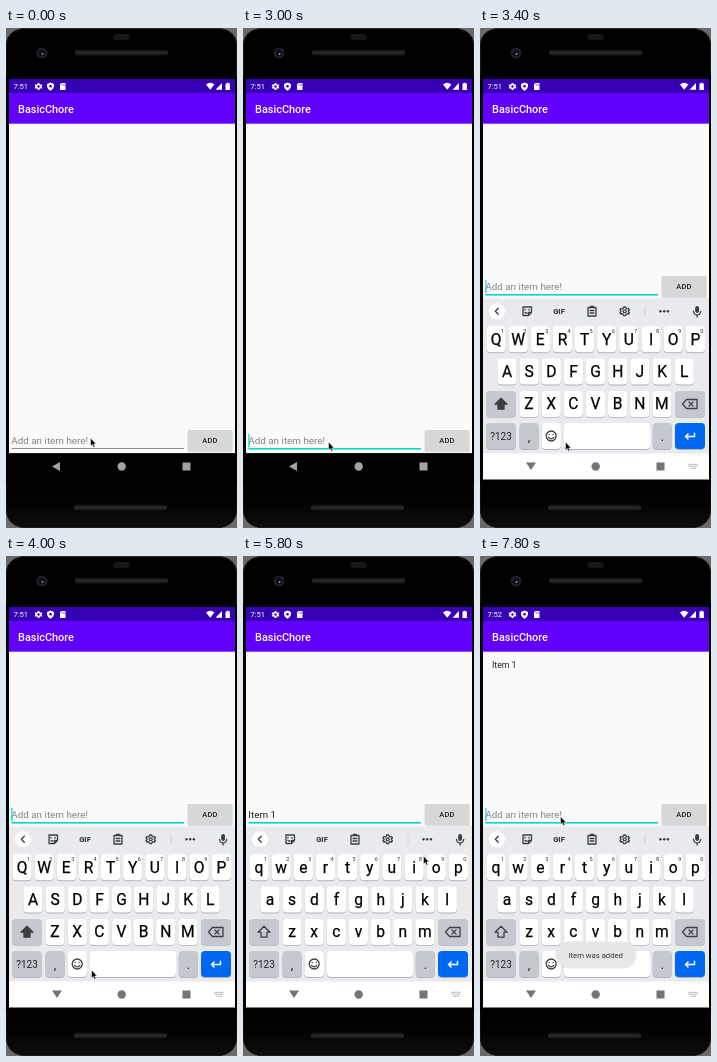
An HTML page for the animation above (8 s loop, 231 by 500 pixels).

```html
<!DOCTYPE html>
<html lang="en">
<head>
<meta charset="utf-8">
<title>To-do app</title>
<style>
  html, body { margin: 0; width: 100%; height: 100%; overflow: hidden; background: #000; }
  svg { display: block; width: 100vw; height: 100vh; }
  text { font-family: Roboto, sans-serif; white-space: pre; }
  .mid { text-anchor: middle; }
  .medium { font-weight: 500; }
  .line { fill: none; stroke: #3c3f43; stroke-width: 1.3; stroke-linecap: round; stroke-linejoin: round; }
  .letter { font-size: 15.6px; fill: #000; stroke: #000; stroke-width: .25; }
</style>
</head>
<body>
<svg viewBox="0 0 231 500">
  <defs>
    <clipPath id="screen"><rect x="3" y="51" width="226" height="400.500"/></clipPath>
    <linearGradient id="slot" x2="0" y2="1">
      <stop stop-color="#0c0c0c"/><stop offset=".5" stop-color="#2a2a2a"/><stop offset="1" stop-color="#141414"/>
    </linearGradient>
    <linearGradient id="chin" x2="0" y2="1">
      <stop stop-color="#000"/><stop offset=".5" stop-color="#020202"/><stop offset="1" stop-color="#0d0d0d"/>
    </linearGradient>
    <path id="gear" d="M-1-4.3H1L1.4-3 2.6-2.3 3.9-2.8 4.7-1.2 3.7-.4V.4L4.7 1.2 3.9 2.8 2.6 2.3 1.4 3 1 4.3H-1L-1.4 3-2.6 2.3-3.9 2.8-4.7 1.2-3.7.4V-.4L-4.7-1.2-3.9-2.8-2.6-2.3-1.4-3Z"/>
  </defs>

  <rect width="231" height="500" fill="#6a6a6a"/>
  <path d="M0 54V16Q1.500 3 16 .5H215Q229.500 3 231 16V54Z" fill="#000" stroke="#2c2c2c"/>
  <path d="M0 450V482Q1.500 497 16 499.500H215Q229.500 497 231 482V450Z" fill="url(#chin)" stroke="#1c1c1c"/>
  <rect y="48" width="231" height="408" fill="#000"/>
  <rect x="107.500" y="6" width="16" height="6" rx="2" fill="#161616"/>
  <rect x="69" y="21.500" width="93" height="6" rx="3" fill="url(#slot)"/>
  <rect x="68" y="476.500" width="93" height="6" rx="3" fill="url(#slot)"/>
  <circle cx="36" cy="25" r="5.500" fill="#202126"/>
  <circle cx="36" cy="25" r="3.300" fill="#0d0f18"/>
  <circle cx="36.500" cy="26" r="1" fill="#8990a8"/>

  <g clip-path="url(#screen)">
    <rect x="3" y="95" width="226" height="330.300" fill="#fafafa"/>
    <rect x="3" y="65" width="226" height="30.700" fill="#6200ff"/>
    <rect x="3" y="51" width="226" height="14" fill="#3700b3"/>
    <g fill="#fff">
      <text id="clock" x="7.500" y="61.300" font-size="7.600">7:51</text>
      <use href="#gear" transform="translate(32.500 58.500) scale(.8)"/>
      <circle cx="32.500" cy="58.500" r="1.200" fill="#3700b3"/>
      <path d="M44.500 54.500 48 56V58.500Q47.500 61.500 44.500 62.800 41.500 61.500 41 58.500V56Z"/>
      <circle cx="44.500" cy="58.300" r="1.300" fill="#3700b3"/>
      <path d="M55.500 55H59.500V62H54V56.500Z"/>
      <path d="M56 56.200V57.800M57.300 56.200V57.800M58.500 56.200V57.800" stroke="#3700b3" stroke-width=".5"/>
      <path d="M200 56.500Q204.200 53.200 208.400 56.500L204.200 61.700Z"/>
      <path d="M209.500 61.700 216 55V61.700Z"/>
      <path d="M219.500 55.500H220.700V54.700H222.700V55.500H223.900V62H219.500Z"/>
      <text class="medium" x="12" y="84.500" font-size="10.900">BasicChore</text>
    </g>
    <text id="item" x="12" y="112.200" font-size="8.700" fill="#222">Item 1</text>

    <g id="entry">
      <rect id="rule" x="5.500" width="172.500"/>
      <text id="field" x="5.300" y="416.400" font-size="9.850"></text>
      <rect id="under" x="5.500" y="418" height=".8" fill="#222"/>
      <rect id="caret" y="406" width="1.200" height="13.500" fill="#03dac5"/>
      <rect x="181.700" y="403.300" width="44.800" height="21" rx="1" fill="#000" opacity=".12"/>
      <rect id="add" x="181.700" y="402" width="44.800" height="21" rx="1"/>
      <text class="mid medium" x="203.900" y="415" font-size="7.500" letter-spacing=".2" fill="#222">ADD</text>
    </g>

    <g id="navDark" fill="#a3a3a3">
      <rect x="3" y="425.300" width="226" height="27" fill="#000"/>
      <path d="M54 434V443L46 438.500Z"/>
      <circle cx="115.700" cy="438.500" r="4.200"/>
      <rect x="176.500" y="434.500" width="8" height="8"/>
    </g>

    <g id="kb">
      <g id="board">
        <rect x="3" y="270.500" width="226" height="156" fill="#e8eaed"/>
        <rect x="3" y="425.500" width="226" height="30" fill="#fff"/>
        <circle cx="17" cy="283.300" r="8" fill="#fff"/>
        <path id="chevron" class="line"/>
        <g id="tools">
          <path class="line" d="M43 279H51.500V284.500L48.500 287.500H43Z M48.500 287.500V284.500H51.500 M45 281.500V282M49 281.500V282M45 284.500Q46 285.500 47 284.800"/>
          <text class="mid" x="79" y="286" font-size="7.500" font-weight="800" fill="#3c3f43">GIF</text>
          <path class="line" d="M108 279.500H116V288H108ZM110.500 279.500V278.300H113.500V279.500M110 282.500H114M110 285H114"/>
          <use href="#gear" class="line" transform="translate(144.700 283.300)"/>
          <circle class="line" cx="144.700" cy="283.300" r="1.500"/>
          <path d="M165 279V288" stroke="#cfd1d4" stroke-width=".8"/>
          <g fill="#3c3f43"><circle cx="180.500" cy="283.300" r="1.200"/><circle cx="184.200" cy="283.300" r="1.200"/><circle cx="187.900" cy="283.300" r="1.200"/></g>
        </g>
        <g id="words" font-size="9.700" fill="#303236">
          <text class="mid" x="53" y="286.600">Item</text>
          <text class="mid" x="115" y="286.600">Items</text>
          <text class="mid" x="177" y="286.600">Itemized</text>
          <path d="M84.500 276.500V290.500M147.500 276.500V290.500" stroke="#c4c6ca" stroke-width=".8"/>
        </g>
        <rect x="215.200" y="278" width="3.800" height="7" rx="1.900" fill="#3c3f43"/>
        <path class="line" d="M213.500 283.500Q214 287 217.100 287 220.200 287 220.700 283.500M217.100 287V289"/>
        <g id="keys"></g>
        <path id="shift" class="line" d="M21 370.200 27 376.200H24V381.200H18V376.200H15Z"/>
        <path class="line" d="M202.500 376 206.500 371.500H217V380.500H206.500ZM209 374 213 378M213 374 209 378"/>
        <g fill="#202226">
          <text class="mid" x="21" y="411.600" font-size="10">?123</text>
          <text class="mid" x="49" y="412.500" font-size="12.500">,</text>
          <text class="mid" x="182.300" y="412.500" font-size="12.500">.</text>
        </g>
        <circle class="line" cx="71.200" cy="408" r="5"/>
        <path class="line" d="M69.300 406.300V406.600M73.100 406.300V406.600M68.500 409.300Q71.200 412.500 73.900 409.300"/>
        <path d="M214.500 404.800V408.500H205.500M208.500 405.500 205.500 408.500 208.500 411.500" fill="none" stroke="#fff" stroke-width="1.400"/>
      </g>
      <g fill="#757575">
        <path d="M46 434.500H56L51 442Z"/>
        <circle cx="115.700" cy="438.500" r="4.200"/>
        <rect x="176.500" y="434.500" width="8" height="8"/>
        <path d="M208.500 436.300H218M208.500 438.200H218M210.500 440.300H216" stroke="#8a8a8a" stroke-width=".9" stroke-dasharray="1 .6"/>
      </g>
    </g>

    <g id="toast">
      <rect x="75.500" y="386" width="81" height="26.500" rx="13.200" fill="#000" opacity=".08"/>
      <rect x="75.500" y="385.500" width="80.500" height="26" rx="13" fill="#e7e7e7"/>
      <text class="mid" x="115.700" y="401.500" font-size="7.700" fill="#333">Item was added</text>
    </g>
  </g>

  <path id="mouse" d="M0 0V8L1.800 6.400 3 9.200 4.400 8.600 3.200 5.900H5.600Z" fill="#000" stroke="#fff" stroke-width=".5"/>
</svg>
<script>
const NS = 'http://www.w3.org/2000/svg';
const LOOP = 8000, STEP = 200;
const el = {};
document.querySelectorAll('[id]').forEach(e => el[e.id] = e);

const set = (e, attrs) => { for (const k in attrs) e.setAttribute(k, attrs[k]); };
const show = (e, on) => e.setAttribute('visibility', on ? 'inherit' : 'hidden');

function add(tag, attrs, text = '') {
  const e = document.createElementNS(NS, tag);
  set(e, attrs);
  e.textContent = text;
  return el.keys.appendChild(e);
}

function key(x, y, width, fill = '#fff') {
  add('rect', { x, y: y + 0.9, width, height: 26, rx: 4, fill: '#b0b3b8' });
  add('rect', { x, y, width, height: 26, rx: 4, fill });
}

const PITCH = 22.15, GREY = '#c5c8ce';
const letters = [];
[['qwertyuiop', 16, 298.3], ['asdfghjkl', 27, 330.6], ['zxcvbnm', 49, 362.9]].forEach(([row, x0, y], r) => {
  [...row].forEach((c, i) => {
    const x = x0 + i * PITCH;
    key(x - 9.6, y, 19.2);
    letters.push(add('text', { x, y: y + 18.4, class: 'mid letter' }, c));
    if (!r) add('text', { x: x + 6.6, y: y + 6.7, class: 'mid', 'font-size': 5.6, fill: '#303236' }, (i + 1) % 10);
  });
});
key(6, 362.9, 30, GREY);
key(195, 362.9, 30, GREY);
[[6, 30, GREY], [39.5, 19.2, GREY], [61.7, 19.2], [84, 86], [172.7, 19.2, GREY], [195, 30, '#0068f0']]
  .forEach(([x, w, fill]) => key(x, 395, w, fill));

// Each table holds [start time, value...]; a value stays until the next row.
const mousePath = [
  [0, 84.5, 410], [200, 84.9, 410.5], [400, 85, 410], [800, 85, 411.5], [1000, 85.5, 413],
  [1200, 85.5, 414.5], [1600, 85.5, 414], [5400, 130, 369], [5600, 174, 315], [5800, 180.5, 300],
  [6000, 195, 273], [6200, 202, 259], [6800, 203, 260], [7000, 199, 267], [7200, 166, 280],
  [7400, 116, 275], [7600, 86, 264], [7800, 80.5, 260.5]
];
const typed = [[0, ''], [4200, 'I'], [4600, 'Item'], [4800, 'Item '], [5200, 'Item 1'], [6400, '']];
const caretOn = [[0, 0], [3000, 1], [3600, 0], [4000, 1], [5000, 0], [5200, 1], [5600, 0],
  [6000, 1], [6200, 0], [6400, 1], [7000, 0], [7400, 1]];
const toastAlpha = [[0, 0], [6600, 0.6], [6800, 1]];

const at = (table, t) => table.reduce((cur, row) => row[0] <= t ? row : cur);

function render(t) {
  const focus = t >= 3000, open = t >= 3200;
  const upper = t >= 3400 && t < 4200;
  const suggest = t >= 4200 && t < 5200;
  const text = at(typed, t)[1];

  el.clock.textContent = t < 7400 ? '7:51' : '7:52';
  show(el.item, t >= 6400);
  set(el.entry, { transform: `translate(0 ${open ? -154 : 0})` });
  set(el.rule, { y: focus ? 420 : 420.1, height: focus ? 1.6 : 0.8, fill: focus ? '#03dac5' : '#777' });
  el.field.textContent = text || 'Add an item here!';
  set(el.field, { fill: text ? '#222' : '#858585' });
  const width = text ? el.field.getComputedTextLength() : 0;
  set(el.caret, { x: 5.3 + width });
  show(el.caret, at(caretOn, t)[1]);
  show(el.under, suggest);
  set(el.under, { width: Math.max(0, width - (text.endsWith(' ') ? 2.4 : 0)) });
  set(el.add, { fill: t >= 6200 && t < 6600 ? '#bfc0c0' : '#d6d7d7' });

  show(el.navDark, !open);
  show(el.kb, open);
  set(el.board, { transform: `translate(0 ${t < 3400 ? 6 : 0})` });
  show(el.tools, open && !suggest);
  show(el.words, suggest);
  set(el.chevron, { d: suggest ? 'M15.8 280.3 18.8 283.3 15.8 286.3' : 'M18.3 280.3 15.3 283.3 18.3 286.3' });
  letters.forEach(e => {
    e.textContent = upper ? e.textContent.toUpperCase() : e.textContent.toLowerCase();
  });
  el.shift.style.fill = upper ? '#3c3f43' : 'none';

  set(el.toast, { opacity: at(toastAlpha, t)[1] });
  const [, mx, my] = at(mousePath, t);
  set(el.mouse, { transform: `translate(${mx} ${my})` });
}

let last = -1;
const start = performance.now();
function tick(now) {
  const t = Math.floor(Math.max(0, now - start) % LOOP / STEP) * STEP;
  if (t !== last) render(last = t);
  requestAnimationFrame(tick);
}
render(0);
requestAnimationFrame(tick);
</script>
</body>
</html>
```
